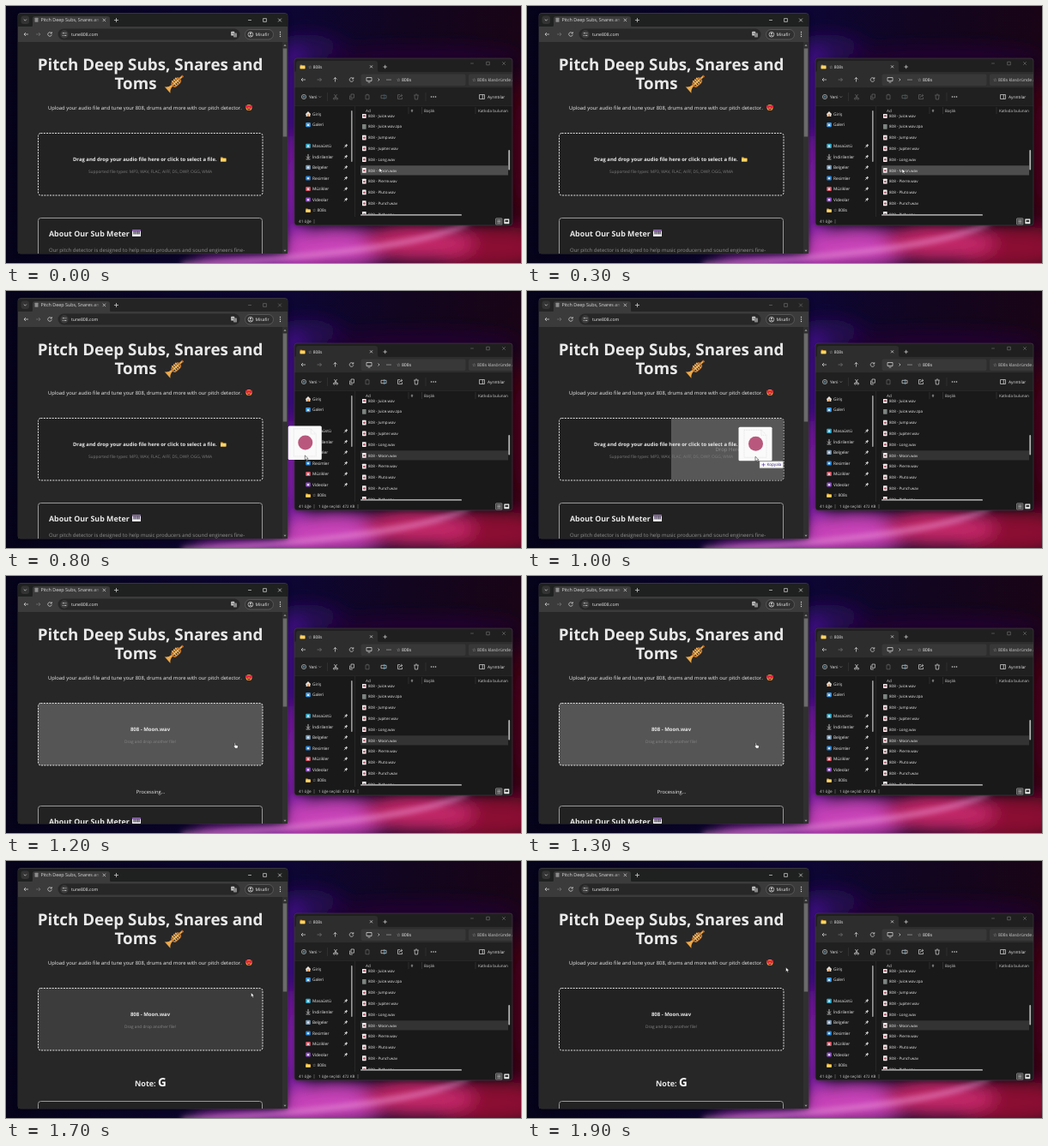
Animation of 600x300 px, one loop 2000 ms. Source, as an HTML page:

```html
<!DOCTYPE html>
<html lang="en">
<head>
<meta charset="utf-8">
<title>Drop a sample</title>
<style>
  html, body { margin: 0; width: 100%; height: 100%; overflow: hidden; background: #080520; }
  svg { display: block; width: 600px; height: 300px; }
  text { font-family: "Open Sans", "Noto Sans", "DejaVu Sans", sans-serif; text-rendering: geometricPrecision; white-space: pre; }
</style>
</head>
<body>
<svg id="stage" viewBox="0 0 600 300"></svg>
<script>
const LOOP = 2000, STEP = 100;
const stage = document.getElementById('stage');

// Text is placed by the middle of its capitals.
const text = (x, y, str, size, fill = '#eee', extra = '') =>
  `<text x="${x}" y="${y + size * 0.36}" font-size="${size}" fill="${fill}" ${extra}>${str}</text>`;
const BOLD = 'font-weight="700"', MID = 'text-anchor="middle"';
const rect = (x, y, w, h, fill, r = 0, extra = '') =>
  `<rect x="${x}" y="${y}" width="${w}" height="${h}" rx="${r}" fill="${fill}" ${extra}/>`;
const line = (d, color = '#ddd', w = 0.7, extra = '') =>
  `<path d="${d}" fill="none" stroke="${color}" stroke-width="${w}" ${extra}/>`;
const fill = (d, color, extra = '') => `<path d="${d}" fill="${color}" ${extra}/>`;
const dot = (x, y, r, color, extra = '') => `<circle cx="${x}" cy="${y}" r="${r}" fill="${color}" ${extra}/>`;
const group = (id, body, extra = '') => `<g id="${id}" ${extra}>${body}</g>`;
const at = (x, y, body) => `<g transform="translate(${x} ${y})">${body}</g>`;
const glow = (x, y, rx, ry, color, turn = 0) =>
  `<ellipse cx="${x}" cy="${y}" rx="${rx}" ry="${ry}" fill="${color}" transform="rotate(${turn} ${x} ${y})"/>`;

const folder = (x, y, s = 1) => `<g transform="translate(${x} ${y}) scale(${s})">`
  + fill('M-3.2-2.4h2.4l.8.8h3.2v4.2h-6.4z', '#e2a52d') + rect(-3.2, -0.9, 6.4, 3.5, '#ffd567', 0.4) + '</g>';

const windowButtons = (x, y, gap, s) =>
  line(`M${x - s} ${y}h${2 * s}`)
  + line(`M${x + gap - s} ${y - s}h${2 * s}v${2 * s}h${-2 * s}z`)
  + line(`M${x + 2 * gap - s} ${y - s}l${2 * s} ${2 * s}m0 ${-2 * s}l${-2 * s} ${2 * s}`);

const arrow = (x, y, dx, color = '#ddd') =>
  line(`M${x - 2.5 * dx} ${y}h${5 * dx}m${-2 * dx}-2l${2 * dx} 2l${-2 * dx} 2`, color);
const reload = (x, y) => line(`M${x + 2} ${y - 1.2}a2.3 2.3 0 1 0 .3 1.6M${x + 2.3} ${y - 2.8}v1.8h-1.8`);

function wallpaper() {
  return `<defs>
    <linearGradient id="night">
      <stop offset="0" stop-color="#05031a"/><stop offset=".55" stop-color="#0d0634"/>
      <stop offset=".78" stop-color="#12051f"/><stop offset="1" stop-color="#190416"/>
    </linearGradient>
    <filter id="soft" x="-50%" y="-50%" width="200%" height="200%"><feGaussianBlur stdDeviation="10"/></filter>
    <filter id="shade" x="-10%" y="-30%" width="120%" height="160%"><feGaussianBlur stdDeviation="3"/></filter>
    <clipPath id="page">${rect(14, 42, 308, 247, '#fff')}</clipPath>
    <clipPath id="files">${rect(407, 126, 178, 117, '#fff')}</clipPath>
    <clipPath id="explorer">${rect(336, 61, 254, 195, '#fff', 3)}</clipPath>
    <linearGradient id="fadeTab" gradientUnits="userSpaceOnUse" x1="102" x2="111">
      <stop offset="0" stop-color="#ddd"/><stop offset="1" stop-color="#3b3b3b"/>
    </linearGradient></defs>`
    + rect(0, 0, 600, 300, 'url(#night)')
    + `<g filter="url(#soft)">`
    + glow(350, 55, 45, 22, '#260a55') + glow(480, 60, 120, 12, '#220630')
    + glow(334, 120, 18, 75, '#3f1086') + glow(334, 215, 16, 65, '#8a1fb4')
    + glow(598, 170, 14, 90, '#480618') + glow(560, 282, 75, 26, '#8a0d30')
    + glow(300, 300, 85, 12, '#982aa8') + glow(385, 282, 65, 24, '#c843b8')
    + glow(480, 276, 65, 22, '#c22668') + '</g>'
    + `<g filter="url(#shade)">${line('M205 302Q330 296 420 283T540 252', '#f0a0dc', 6, 'opacity=".55"')}</g>`
    + `<g filter="url(#shade)" opacity=".4">${rect(14, 11, 314, 279, '#000', 4)}${rect(336, 64, 254, 193, '#000', 4)}</g>`;
}

function trumpet() {
  return `<g transform="translate(197 90) rotate(-42)">`
    + fill('M-12-5Q-9.5-1.3-4-1.2H12v2H-4Q-9.5 1-12 5Z', '#eda94a')
    + `<rect x="-4" y="-3" width="11" height="6.4" rx="3" fill="none" stroke="#c9792e" stroke-width="1.5"/>`
    + [-1.5, 1, 3.5].map(x => rect(x, -4.6, 1.2, 8, '#f4bd6a', 0.5)).join('')
    + rect(11, -1.6, 1.7, 2.9, '#b86526', 0.5) + '</g>';
}

const loveFace = at(283, 118.5, dot(0, 0, 3.6, '#f3a53c')
  + [-1.8, 1.8].map(x => fill(`M${x} 1.4l-2.2-2.2q-.2-2 1.3-1.9l.9.8l.9-.8q1.5-.1 1.3 1.9z`, '#e8233f')).join('')
  + fill('M-1.9 1.2h3.8q-.4 1.9-1.9 1.9t-1.9-1.9z', '#8d2530'));

const piano = at(147, 261.5, rect(0, 0, 10, 7.5, '#f4f2f8', 0.5) + rect(0, 0, 10, 1.4, '#8c55b8')
  + [1.5, 3.6, 5.7, 7.6].map(x => rect(x, 1, 1.1, 4, '#221b2b')).join(''));

function page() {
  return `<g clip-path="url(#page)">` + rect(14, 42, 308, 247, '#272727')
    + text(168, 68, 'Pitch Deep Subs, Snares and', 18.8, '#e8e8e8', BOLD + ' ' + MID)
    + text(126.5, 90, 'Toms', 18.8, '#e8e8e8', BOLD) + trumpet()
    + text(49, 118.5, 'Upload your audio file and tune your 808, drums and more with our pitch detector.', 5.85) + loveFace
    + `<rect id="zone" x="37.5" y="148.5" width="261.5" height="72.5" rx="3" stroke="#e4e4e4" stroke-dasharray="2 1.3"/>`
    + group('dropHint', rect(168, 149, 130.5, 71.5, '#575757') + text(234, 184.5, 'Drop Here', 6, '#8a8a8a', MID))
    + group('invite', text(78, 179, 'Drag and drop your audio file here or click to select a file.', 5.9, '#e8e8e8', BOLD)
      + folder(253.2, 179) + text(168, 193.5, 'Supported file types: MP3, WAV, FLAC, AIFF, DS, DWP, OGG, WMA', 4.85, '#7c7c7c', MID))
    + group('loaded', text(168, 179, '808 - Moon.wav', 6, '#e8e8e8', BOLD + ' ' + MID)
      + text(168, 193.5, 'Drag and drop another file!', 4.75, '#868686', MID))
    + group('processing', text(168.5, 251.8, 'Processing...', 5.8, '#eee', MID))
    + group('note', text(150, 259.5, 'Note:', 9, '#e8e8e8', BOLD) + text(177, 258, 'G', 13.5, '#fff', BOLD))
    + group('about', rect(37.5, 247.5, 261, 90, '#222', 3, 'stroke="#999"')
      + text(50, 266, 'About Our Sub Meter', 8.9, '#e8e8e8', BOLD) + piano
      + text(50, 285, 'Our pitch detector is designed to help music producers and sound engineers fine-', 6, '#909090'))
    + '</g>';
}

function browser() {
  return rect(14, 8.5, 314, 280.5, '#272727', 3, 'stroke="#4a4a4a" stroke-width=".6"')
    + `<path id="strip" d="M14 25V12q0-3 3-3h308q3 0 3 3v13z"/>`
    + rect(17.5, 11.5, 9.5, 9.5, '#343434', 3) + line('M20.7 15.5l1.6 1.6l1.6-1.6')
    + fill('M28 25q3 0 3-3v-7q0-3 3-3h84q3 0 3 3v7q0 3 3 3z', '#3b3b3b')
    + rect(33.5, 13.8, 4, 5, '#8c8c8c', 0.4)
    + text(40.5, 16.3, 'Pitch Deep Subs, Snares an', 5.4, 'url(#fadeTab)')
    + line('M112.7 14.7l3.4 3.4m0-3.4l-3.4 3.4') + line('M126 16.5h5m-2.5-2.5v5')
    + group('chromeButtons', windowButtons(284, 16.5, 17.5, 1.9))
    + rect(14, 24, 314, 18.5, '#3b3b3b')
    + arrow(23.5, 33, -1) + arrow(37.5, 33, 1, '#777') + reload(51, 33)
    + rect(60.5, 26.5, 212, 13, '#272727', 6.5)
    + dot(68, 33, 4.7, '#3c3c3c') + line('M65.8 31.7h2.6m1 0h1M65.8 34.4h1m1 0h2.6', '#ddd', 0.8)
    + text(76, 33, 'tune808.com', 5.1)
    + rect(262.2, 29.8, 4, 4.8, '#ccc', 0.6) + rect(265, 31.6, 4, 4.8, '#888', 0.6) + text(264.2, 32.2, 'A', 3, '#333', MID)
    + rect(278.5, 27.5, 33, 11.5, '#303030', 5.7, 'stroke="#777" stroke-width=".5"')
    + line('M282 33.2a2.9 2.9 0 1 0 5.8 0a2.9 2.9 0 1 0-5.8 0M283 35.2q1.9-1.8 3.8 0') + dot(284.9, 32.2, 1, '#ddd')
    + text(290.5, 33.2, 'Misafir', 5)
    + [30.5, 33, 35.5].map(y => dot(319.5, y, 0.65, '#ddd')).join('')
    + page()
    + rect(322, 42.5, 6, 246.5, '#303030') + rect(322.7, 49.5, 4.6, 103, '#6b6b6b')
    + fill('M323.4 46.8l1.6-2l1.6 2z', '#999') + fill('M323.4 284.8l1.6 2l1.6-2z', '#999');
}

function sidebar() {
  const home = at(352, 126, fill('M-3.2.2L0-3L3.2.2L2.4 1v2h-4.8v-2z', '#e8e0d8') + rect(-0.9, 0.4, 1.8, 2.6, '#e08a3c'));
  const download = line('M352 172.9v4.6m-2-1.8l2 2l2-2M349.6 178.9h4.8', '#ddd', 0.8);
  const places = [
    ['Giriş', 126, home], ['Galeri', 138.7, '#3d9be9'], ['Masaüstü', 163.3, '#31a9c9'],
    ['İndirilenler', 175.9, download], ['Belgeler', 188.3, '#7b9bb5'], ['Resimler', 201, '#2684d8'],
    ['Müzikler', 213.5, '#dc5967'], ['Videolar', 226, '#8c4bc6']];
  const tile = (y, color) => rect(349.2, y - 2.6, 5.6, 5.2, color, 1) + rect(350.8, y - 0.8, 2.4, 2, '#eef', 0.4);
  const pin = y => at(396, y, line('M-2.2 2.2l1.6-1.6', '#ccc', 0.7) + fill('M-1.8-.5l2.3 2.3l.4-1.4l1.2-1.1l-1.5-1.5l-1 1.3z', '#ccc'));
  return places.map(([label, y, icon], i) =>
    (icon[0] === '#' ? tile(y, icon) : icon) + text(357, y, label, 4.8) + (i > 1 ? pin(y) : '')).join('')
    + folder(352, 238.5, 0.85) + text(357, 238.5, '☆ 808s', 4.8)
    + rect(402, 122, 1.6, 60, '#9a9a9a', 0.8);
}

function fileList() {
  const names = ['Juice.wav', 'Juice.wav.zpa', 'Jump.wav', 'Jupiter.wav', 'Long.wav', 'Moon.wav', 'Pierre.wav', 'Pluto.wav', 'Punch.wav', 'Rich.wav'];
  return `<g clip-path="url(#files)"><rect id="row" x="413" y="186.2" width="176" height="11.2" rx="1"/>`
    + names.map((name, i) => {
      const y = 128 + 12.78 * i, plain = i === 1;
      return rect(415, y - 2.9, 4.6, 5.8, plain ? '#7d8480' : '#f2eeee', 0.4)
        + (plain ? '' : dot(417.3, y + 0.2, 1.2, '#a8485c')) + text(422, y, '808 - ' + name, 4.5);
    }).join('') + '</g>';
}

function toolbar() {
  const paste = at(421, 106, line('M-2-2.2h4v5h-4zM-.8-2.8h1.6', '#666'));
  const tools = at(384, 106, line('M-1.6-3l2.8 4.6M1.6-3l-2.8 4.6')
      + line('M-2.6 2.2a1 1 0 1 0 2 0a1 1 0 1 0-2 0M.6 2.2a1 1 0 1 0 2 0a1 1 0 1 0-2 0'))
    + at(403, 106, line('M-1-3h3.4v4.2h-3.4zM-2.4-1.4v4.4h3.2'))
    + at(440, 106, line('M-3-1.7h6v3.4h-6z') + line('M.6-3v6', '#6fb6dd'))
    + at(459, 106, line('M0-2.4h-2.5v5h5v-2M-.8 1q0-2.6 3.4-2.6m-1.4-1.4l1.6 1.4l-1.6 1.4'))
    + at(478, 106, line('M-2.6-2h5.2M-2-2l.4 5h3.2l.4-5M-.8-3h1.6'));
  return `<circle cx="347" cy="106" r="2.6" fill="none" stroke="#ddd" stroke-width=".6"/>`
    + line('M345.6 106h2.8m-1.4-1.4v2.8', '#7cc4ea', 0.6)
    + text(353, 106, 'Yeni', 4.9) + line('M364.5 105.4l1.3 1.3l1.3-1.3', '#999', 0.6)
    + line('M374.5 101v10M489 101v10', '#3a3a3a', 0.6) + group('tools', tools) + paste
    + [495.5, 498, 500.5].map(x => dot(x, 106, 0.75, '#ddd')).join('')
    + line('M551.5 103.5h6v5h-6zm3.8 0v5') + text(561, 106, 'Ayrıntılar', 4.8);
}

function explorer() {
  return `<g clip-path="url(#explorer)">` + rect(336, 61, 254, 195, '#191919')
    + rect(336, 61, 254, 16, '#1f1f1f') + fill('M336 77q2 0 2-2v-8q0-3 3-3h89q3 0 3 3v8q0 2 2 2z', '#2d2d2d')
    + folder(345.5, 70.8, 0.9) + text(352, 70.8, '☆ 808s', 4.9)
    + line('M424 69.3l3 3m0-3l-3 3') + line('M439.5 71h4.4m-2.2-2.2v4.4')
    + `<g opacity=".4">${windowButtons(543, 67, 18.5, 1.8)}</g>`
    + rect(336, 77, 254, 18.5, '#2d2d2d')
    + arrow(346.5, 86, -1) + arrow(365, 86, 1, '#777') + line('M383.5 88.5v-5m-2 2l2-2l2 2') + reload(402.5, 86)
    + rect(413.5, 79.5, 122, 13.5, '#383838', 2) + rect(539, 79.5, 60, 13.5, '#383838', 2)
    + line('M420 83.5h6v4h-6zm1.6 5.6h2.8') + line('M433.5 84.5l1.5 1.5l-1.5 1.5')
    + [444, 446, 448].map(x => dot(x, 86, 0.6, '#ddd')).join('')
    + text(455, 86, '☆ 808s', 5.1) + text(543, 86, '☆ 808s klasöründe ara', 5.1, '#ccc')
    + rect(336, 95.5, 254, 21, '#202020') + line('M336 116.5h254', '#303030', 0.5) + toolbar()
    + sidebar() + line('M406.5 117v129', '#333', 0.6)
    + text(419, 122, 'Ad', 4.6, '#ccc') + text(471.5, 122, '#', 4.6, '#ccc')
    + text(487, 122, 'Başlık', 4.6, '#ccc') + text(550, 122, 'Katkıda bulunan', 4.6, '#ccc')
    + line('M469 118v8M484.5 118v8M547 118v8', '#444', 0.5) + fileList()
    + rect(413, 243, 118, 1.8, '#a0a0a0', 0.9) + rect(585.3, 168, 1.8, 23.5, '#b0b0b0', 0.9)
    + text(341, 251.6, '41 öğe', 4.7, '#ccc') + line('M359 249v5', '#777', 0.6)
    + group('picked', text(364, 251.6, '1 öğe seçildi  472 KB', 4.5, '#ccc') + line('M410 249v5', '#777', 0.6))
    + rect(570.5, 247.8, 7.5, 7.5, '#444', 0.8, 'stroke="#bbb" stroke-width=".5"')
    + line('M572.3 250h4m-4 1.6h4m-4 1.6h4', '#ddd', 0.6)
    + rect(580.3, 248.6, 6, 5.6, '#eee', 0.5) + rect(581.5, 249.8, 3.6, 2.4, '#333')
    + '</g>' + rect(336, 61, 254, 195, 'none', 3, 'stroke="#4a3b4a" stroke-width=".6"');
}

// Everything here is relative to the tip of the pointer.
function pointer() {
  const outline = 'stroke="#111" stroke-width=".5" stroke-linejoin="round"';
  return group('pointer',
    group('parcel', rect(-19.5, -34.5, 39, 39.5, '#fafafa', 1.5)
      + group('parcelIcon', line('M-13-31h20l6 6v26h-26zM7-31v6h6', '#d2d2d2', 0.6, 'stroke-dasharray="1 1"') + dot(0.5, -15, 8.5, '#b9587c')))
    + group('copyTip', rect(5, 5.5, 27.5, 8, '#f7f7f7', 0.5, 'stroke="#999" stroke-width=".4"')
      + line('M7.5 9.5h4m-2-2v4', '#5b3fb0', 0.7) + text(13.5, 9.4, 'Kopyala', 4.6, '#3d2a86'))
    + group('arrowHand', fill('M0 0v5.4l1.3-1.1l.9 2l1-.5l-.9-1.9h1.7z', '#fff', outline))
    + group('pointHand', fill('M.2.3q.8-.8 1.3.2v2.3l2 .4q1 .3.9 1.3l-.6 2.2h-2.8l-2-2.7q.1-.9 1.2-.1z', '#fff', outline)));
}

stage.innerHTML = wallpaper() + browser() + explorer() + pointer();

const el = id => document.getElementById(id);
const show = (id, on) => el(id).style.display = on ? '' : 'none';
const set = (id, name, value) => el(id).setAttribute(name, value);

const path = [[0, 435, 189], [300, 437, 190], [400, 437, 190], [600, 430.5, 190.5], [1000, 266, 193.3],
  [1200, 266, 194.5], [1300, 266, 194.5], [1500, 269.3, 183], [1900, 301.5, 124]];

function position(t) {
  const i = path.findIndex(p => p[0] >= t);
  if (i < 1) return path[0].slice(1);
  const [a, b] = [path[i - 1], path[i]];
  const u = (t - a[0]) / (b[0] - a[0]), k = u * u * (3 - 2 * u);
  return [a[1] + (b[1] - a[1]) * k, a[2] + (b[2] - a[2]) * k];
}

function draw(t) {
  const picked = t >= 400, dropped = t >= 1200, noted = t >= 1400;
  const dragging = t >= 600 && !dropped, over = t >= 900 && !dropped;
  const hovering = dropped && t < 1700;

  set('pointer', 'transform', `translate(${position(t).join(' ')})`);
  show('parcel', dragging);
  show('parcelIcon', t >= 700);
  show('copyTip', over);
  show('pointHand', hovering);
  show('arrowHand', !hovering);

  set('strip', 'fill', picked && !dropped ? '#242424' : '#1f2020');
  set('chromeButtons', 'opacity', picked && !dropped ? 0.38 : 1);
  set('row', 'fill', picked ? '#333' : '#4d4d4d');
  set('tools', 'opacity', picked ? 1 : 0.38);
  show('picked', picked);

  set('zone', 'fill', hovering ? '#555' : dropped && t < 1800 ? '#3c3c3c' : '#222');
  show('dropHint', over);
  show('invite', !dropped);
  show('loaded', dropped);
  show('processing', dropped && !noted);
  show('note', noted);
  set('about', 'transform', `translate(0 ${noted ? 33 : dropped ? 21 : 0})`);
}

const start = performance.now();
function tick() {
  const t = (performance.now() - start) % LOOP;
  draw(Math.floor(t / STEP) * STEP);
  requestAnimationFrame(tick);
}
tick();
</script>
</body>
</html>
```
